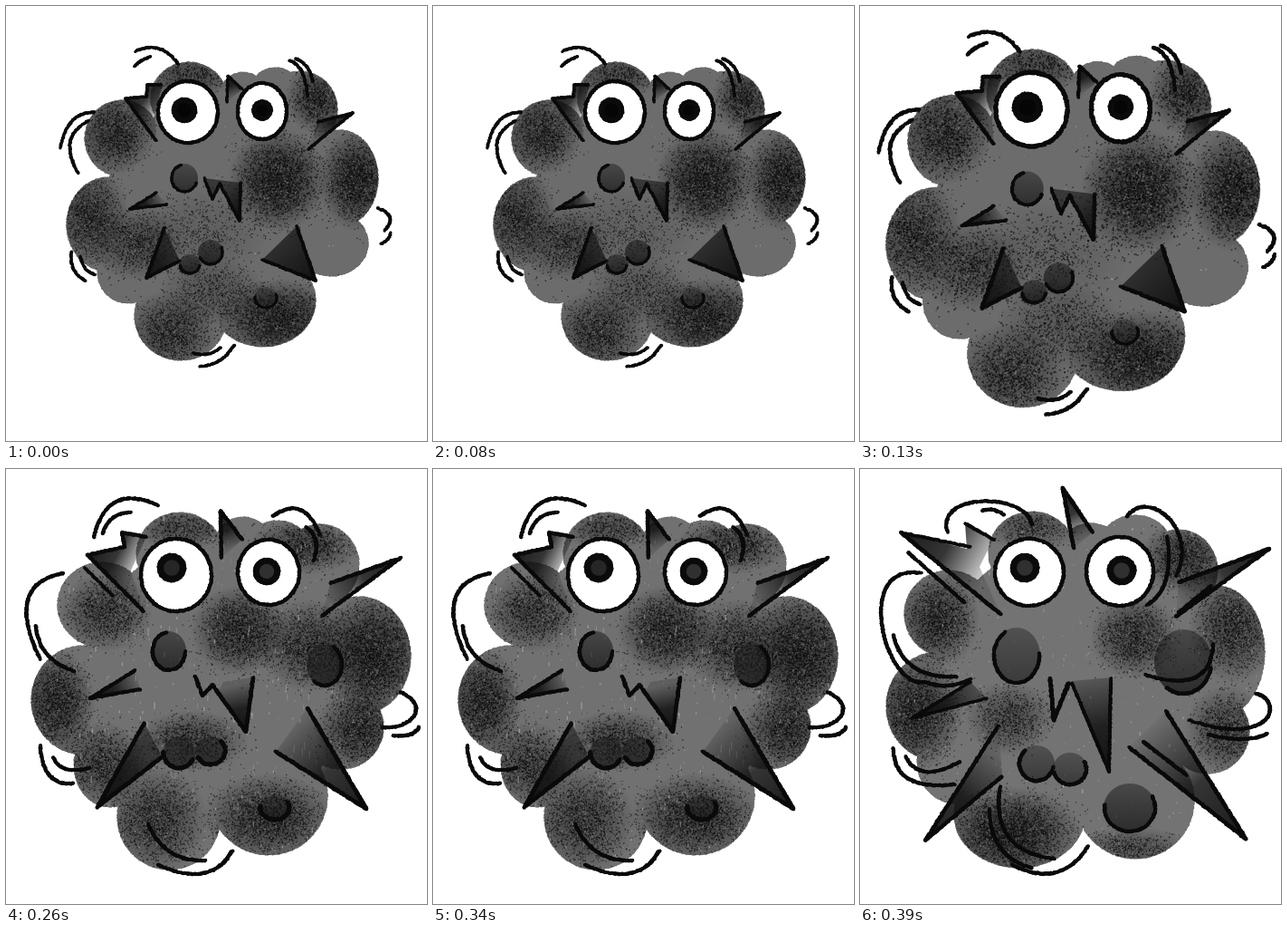
Animation of 465x480 px, one loop 0.52 s. Source, as an HTML page with a canvas:

```html
<!DOCTYPE html>
<html lang="en">
<head>
<meta charset="utf-8">
<title>Spiky cloud</title>
<style>
html, body { margin: 0; width: 100%; height: 100%; overflow: hidden; background: #fff; }
canvas { display: block; }
</style>
</head>
<body>
<canvas id="stage" width="465" height="480"></canvas>
<script>
const W = 465, H = 480, STEP = 130, TAU = Math.PI * 2;
const INK = '#0b0b0b';
let g, seed = 1;

function rand() {
  seed = (seed + 0x6D2B79F5) | 0;
  let t = Math.imul(seed ^ (seed >>> 15), 1 | seed);
  t = (t + Math.imul(t ^ (t >>> 7), 61 | t)) ^ t;
  return ((t ^ (t >>> 14)) >>> 0) / 4294967296;
}
const spread = r => (rand() - .5) * 2 * r;
const bell = () => (rand() + rand() + rand() + rand() - 2) * 1.1;
const parse = s => s.split(' ').map(p => p.split(',').map(Number));

function dot(x, y, r) {
  g.beginPath();
  g.arc(x, y, r, 0, TAU);
  g.fill();
}

// Point on the smooth curve that passes through every given point
function through(pts, t) {
  const n = pts.length - 1;
  let x = 0, y = 0;
  pts.forEach((p, i) => {
    let k = 1;
    for (let j = 0; j <= n; j++) if (j !== i) k *= (t * n - j) / (i - j);
    x += p[0] * k;
    y += p[1] * k;
  });
  return [x, y];
}

function chalk(at, length, w, color = INK) {
  g.fillStyle = color;
  const n = Math.ceil(length / .8);
  for (let i = 0; i <= n; i++) {
    const [x, y] = at(i / n);
    dot(x + spread(.5), y + spread(.5), w * (.38 + rand() * .14));
  }
}

function pen(pts, w = 4.2) {
  let len = 0;
  for (let i = 1; i < pts.length; i++)
    len += Math.hypot(pts[i][0] - pts[i - 1][0], pts[i][1] - pts[i - 1][1]);
  chalk(t => through(pts, t), len * 1.1, w);
}
const marks = (w, ...list) => list.forEach(s => pen(parse(s), w));

function lines(s, w) {
  const p = parse(s);
  for (let i = 1; i < p.length; i++) pen([p[i - 1], p[i]], w);
}

function ring(x, y, rx, ry, w, from = 0, to = TAU, color = INK) {
  chalk(t => {
    const a = from + (to - from) * t;
    return [x + rx * Math.cos(a), y + ry * Math.sin(a)];
  }, (to - from) * (rx + ry) / 2, w, color);
}

function oval(x, y, rx, ry, color) {
  g.fillStyle = color;
  g.beginPath();
  g.ellipse(x, y, rx, ry, 0, 0, TAU);
  g.fill();
}

// Grey lumps; everything shaded afterwards stays inside them until unclipped
function body(color, lumps) {
  const shape = new Path2D();
  for (const [x, y, rx, ry] of lumps) {
    shape.moveTo(x + rx, y);
    shape.ellipse(x, y, rx, ry, 0, 0, TAU);
    ring(x, y, rx - 1, ry - 1, 3, 0, TAU, color);
  }
  g.fillStyle = color;
  g.fill(shape);
  g.save();
  g.clip(shape);
}

function shade(x, y, rx, ry, k = 1) {
  g.save();
  g.translate(x, y);
  g.scale(rx, ry);
  const soft = g.createRadialGradient(0, 0, 0, 0, 0, 1.3);
  soft.addColorStop(0, `rgba(15,15,15,${.5 * k})`);
  soft.addColorStop(.5, `rgba(15,15,15,${.36 * k})`);
  soft.addColorStop(1, 'rgba(15,15,15,0)');
  g.fillStyle = soft;
  g.fillRect(-1.3, -1.3, 2.6, 2.6);
  g.restore();
  for (let i = rx * ry * k * 1.1; i > 0; i--) {
    const v = rand() < .85 ? 10 : 120;
    g.fillStyle = `rgba(${v},${v},${v},.65)`;
    const s = .8 + rand() * .7;
    g.fillRect(x + bell() * rx * .8, y + bell() * ry * .8, s, s);
  }
}

function flecks(n, tall) {
  for (let i = 0; i < n; i++) {
    g.fillStyle = `rgba(205,205,205,${.15 + rand() * .4})`;
    g.fillRect(30 + rand() * 410, 50 + rand() * 385, .6 + rand(), 1 + rand() * rand() * tall);
  }
}

function wedge(s, fade = .15) {
  const p = parse(s), [tip] = p, a = p[1], b = p[p.length - 1];
  const k = g.createLinearGradient(...tip, (a[0] + b[0]) / 2, (a[1] + b[1]) / 2);
  k.addColorStop(0, 'rgba(12,12,12,.95)');
  k.addColorStop(.5, 'rgba(18,18,18,.85)');
  k.addColorStop(1, `rgba(20,20,20,${fade})`);
  g.fillStyle = k;
  g.beginPath();
  p.forEach(q => g.lineTo(...q));
  g.fill();
}

// Tip first, then the two ends of its edges
function spike(s, w = 4, fade) {
  const [tip, a, b] = parse(s);
  wedge(s, fade);
  pen([tip, a], w);
  pen([tip, b], w);
}

function wart(x, y, rx, ry, from, to, k = .6, w = 4) {
  const c = g.createLinearGradient(x, y - ry, x, y + ry);
  c.addColorStop(0, `rgba(20,20,20,${k * .6})`);
  c.addColorStop(1, `rgba(20,20,20,${k})`);
  oval(x, y, rx, ry, c);
  ring(x, y, rx - 1, ry - 1, w, from, to);
}

function eye(x, y, rx, ry, px, py, pr, core) {
  oval(x, y, rx, ry, '#fff');
  ring(x, y, rx - 1, ry - 1, 4.4);
  oval(px, py, pr, pr, INK);
  ring(px, py, pr - 1, pr - 1, 2.5);
  oval(px, py, pr * .55, pr * .55, core);
}

function small() {
  body('#6c6c6c', [
    [240, 220, 130, 120], [202, 102, 42, 40], [262, 95, 24, 22], [298, 94, 28, 26],
    [325, 114, 41, 42], [128, 146, 41, 42], [113, 241, 46, 52], [135, 294, 34, 34],
    [193, 342, 51, 49], [284, 325, 58, 51], [369, 190, 42, 53], [359, 262, 41, 36]]);
  shade(120, 140, 34, 36, 1.1);
  shade(92, 232, 34, 44);
  shade(145, 262, 40, 32, .8);
  shade(203, 78, 38, 18, .9);
  shade(345, 102, 28, 30, 1.1);
  shade(300, 192, 42, 44, 1.35);
  shade(388, 192, 34, 44, 1.3);
  shade(182, 360, 40, 36, .9);
  shade(300, 345, 54, 34, 1.25);
  shade(228, 315, 46, 30, .55);
  shade(215, 250, 60, 40, .3);
  flecks(45, 1);
  g.restore();

  wedge('132,102 155,100 156,87 173,88 164,118 166,148', .3);
  lines('172,87 156,87 155,100 132,102 166,149', 3.6);
  spike('245,77 244,106 261,92', 3.4);
  spike('383,118 344,128 334,158', 3.6);
  spike('137,224 166,206 178,219', 3.4);
  spike('155,300 175,245 192,281', 3.8, .6);
  spike('342,303 321,243 283,280', 4, .7);
  wedge('258,238 259,195 219,190 228,213 236,198', .6);
  lines('219,190 228,213 236,196 258,237 259,195', 3.6);

  wart(197, 190, 15, 16, .3, 4.5, .7, 3.4);
  wart(203, 285, 12, 11, .2, 3, .8, 3.4);
  wart(226, 272, 14, 14, -.4, 2.7, .8, 3.4);
  wart(287, 322, 13, 12, -.4, 3.2, .5, 3.2);
  eye(201, 117, 34, 35, 197, 115, 14, '#050505');
  eye(283, 116, 28, 32, 283, 115, 11.5, '#050505');

  marks(3.8, '143,50 169,47 190,64', '142,67 150,60 160,56',
    '313,60 327,73 333,100', '320,58 333,68 339,84',
    '98,117 73,127 60,157', '91,127 71,150 80,185',
    '72,272 75,291 88,303', '82,276 88,290 98,296',
    '207,383 223,384 237,377', '214,398 236,391 252,374',
    '410,223 424,233 418,248', '414,262 421,258 425,250');
}

function medium() {
  body('#717171', [
    [235, 230, 150, 150], [192, 94, 48, 46], [262, 85, 32, 32], [300, 92, 38, 35],
    [347, 106, 43, 45], [106, 150, 49, 47], [85, 255, 57, 60], [115, 327, 40, 46],
    [180, 384, 57, 58], [290, 361, 65, 65], [390, 206, 57, 65], [370, 285, 47, 46]]);
  shade(110, 158, 40, 34, .9);
  shade(55, 258, 34, 46, 1.2);
  shade(105, 325, 38, 36, .9);
  shade(258, 178, 42, 38, 1.2);
  shade(405, 205, 46, 54, 1.35);
  shade(335, 195, 44, 40, .9);
  shade(390, 288, 38, 36, 1.1);
  shade(165, 388, 46, 46, .9);
  shade(290, 385, 56, 38, 1.1);
  shade(205, 300, 48, 26, .9);
  shade(330, 85, 48, 24, 1);
  shade(195, 66, 42, 18, .8);
  flecks(650, 9);
  g.restore();

  wedge('90,95 130,86 128,70 155,75 138,112 152,157', .15);
  lines('155,75 128,70 131,86 90,95 152,157', 4.4);
  lines('87,109 118,140', 3.8);
  spike('237,46 238,98 261,78', 4.4);
  spike('436,98 358,126 349,162', 4.4);
  spike('93,253 143,222 148,243', 4.2);
  spike('101,373 153,280 172,318', 4.6, .5);
  spike('398,375 333,264 298,312', 4.8);
  wedge('265,290 273,230 240,235 234,247', .2);
  lines('209,229 217,250 228,238 265,290 273,230', 4.6);

  wart(180, 201, 19, 22, 0, 4.6, .75, 4.4);
  wart(352, 216, 20, 24, -1, 2.2, .75, 4.4);
  wart(191, 313, 18, 18, .4, 3.2, .7, 5);
  wart(226, 311, 17, 16, -.8, 2.7, .7, 5);
  wart(297, 374, 17, 14, -.5, 3.3, .55, 5);
  eye(188, 117, 40, 41, 183, 109, 16, '#262626');
  eye(290, 114, 35, 37, 288, 113, 15, '#303030');

  marks(4.4, '97,75 122,36 168,40', '107,71 118,54 138,48',
    '295,52 325,45 347,73', '331,64 342,79 340,101',
    '63,115 24,145 38,210', '33,173 45,204 75,223',
    '38,305 48,338 74,347', '52,318 66,331 92,330',
    '157,392 182,423 220,432', '168,437 218,446 250,421',
    '435,246 453,264 442,280 415,285', '456,285 446,293 428,294');
}

function large() {
  body('#737373', [
    [235, 230, 150, 150], [190, 93, 48, 46], [255, 90, 35, 30], [304, 90, 42, 39],
    [352, 112, 43, 45], [98, 160, 49, 48], [86, 262, 57, 60], [105, 322, 42, 47],
    [176, 382, 72, 58], [304, 366, 65, 64], [394, 202, 53, 73], [384, 290, 46, 46]]);
  shade(86, 165, 36, 42, 1.1);
  shade(62, 268, 40, 50, 1.2);
  shade(165, 402, 62, 40, 1.35);
  shade(303, 185, 38, 36, 1.05);
  shade(412, 175, 38, 48, 1);
  shade(405, 288, 36, 38, .9);
  shade(165, 275, 38, 32, .8);
  shade(358, 98, 38, 30, 1.1);
  shade(190, 65, 42, 20, .7);
  shade(300, 418, 52, 18, .7);
  flecks(420, 4);
  g.restore();

  wedge('45,70 118,88 116,60 147,78 132,108 155,160', .15);
  lines('45,70 122,86', 4);
  lines('45,70 155,160', 4.6);
  lines('116,60 148,78', 4);
  lines('53,92 115,147', 4.4);
  spike('224,21 236,87 257,70', 4.6);
  spike('452,88 352,125 349,163', 4.6, .1);
  lines('352,158 388,129', 4.4);
  spike('57,275 122,235 140,253', 3.6, .4);
  spike('72,410 153,283 157,339', 4.4, .1);
  spike('426,408 338,267 297,307', 4.6, .05);
  lines('313,301 361,338', 4.4);
  wedge('275,335 277,230 234,234', .3);
  lines('230,237 214,277 210,231', 5);
  lines('234,236 275,334 277,231', 4);

  wart(173, 206, 26, 31, -.1, 4.2, .6, 4.4);
  wart(357, 213, 32, 36, .2, 2.2, .75, 4.6);
  wart(195, 325, 20, 20, .2, 4, .6, 4.6);
  wart(232, 331, 19, 18, -.5, 2.9, .6, 4.6);
  wart(298, 374, 29, 27, -.5, 3.3, .75, 4.4);
  eye(187, 114, 39, 38, 182, 109, 16, '#303030');
  eye(287, 113, 38, 39, 289, 112, 16, '#303030');

  marks(4.4, '97,70 113,40 160,38 190,62', '135,46 147,45 159,51',
    '295,52 326,44 352,72 349,118', '339,74 338,122 317,150',
    '68,115 25,142 34,205 72,235', '37,183 60,219 107,229', '72,235 97,239 122,232',
    '37,308 54,342 105,348', '50,317 73,334 110,323',
    '143,375 155,418 190,440', '155,350 164,406 215,430',
    '168,437 216,445 252,416',
    '437,248 453,265 432,285 363,277', '450,292 422,298 385,293',
    '315,227 370,230 390,193');
}

function paint(draw, scale = 1, dx = 0, dy = 0) {
  const c = document.createElement('canvas');
  c.width = W;
  c.height = H;
  g = c.getContext('2d');
  seed = 77;
  g.fillStyle = '#fff';
  g.fillRect(0, 0, W, H);
  g.setTransform(scale, 0, 0, scale, dx, dy);
  draw();
  return c;
}

const poses = [paint(small), paint(small, 1.199, -51.4, -26.2), paint(medium), paint(large)];
const screen2d = document.getElementById('stage').getContext('2d');
const start = performance.now();

function tick() {
  const t = performance.now() - start;
  screen2d.drawImage(poses[Math.floor(t / STEP) % poses.length], 0, 0);
  requestAnimationFrame(tick);
}
tick();
</script>
</body>
</html>
```
